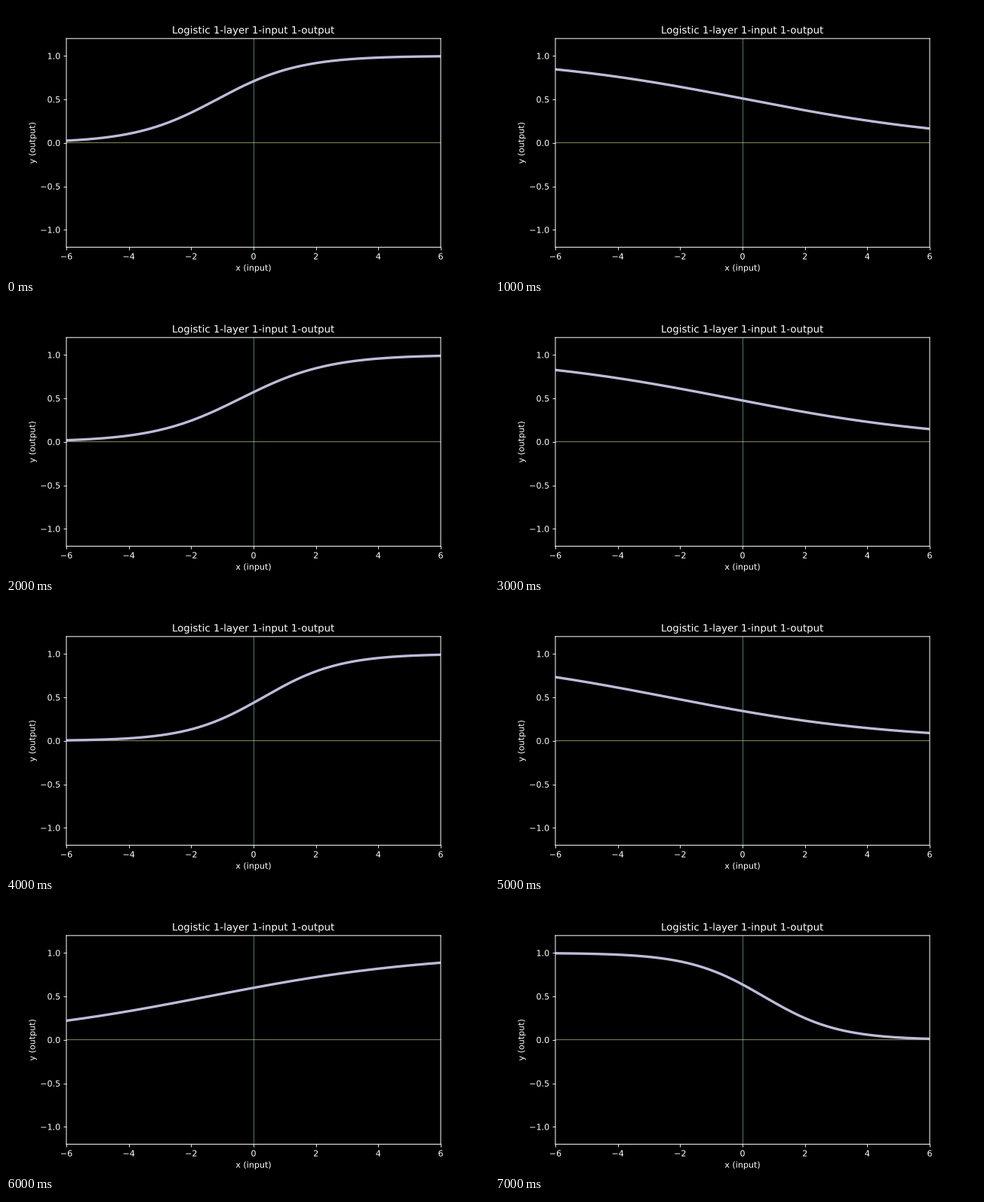
A matplotlib script that plays this animation: 640 px wide and 360 px high, repeating every 8 s.

```python
import numpy as np
import matplotlib.pyplot as plt
from matplotlib.animation import FuncAnimation
from matplotlib.patheffects import Normal
from matplotlib.text import Text

plt.style.use("dark_background")
plt.rcParams.update({"axes.linewidth": 0.9, "text.hinting": "none"})

# One neuron per step: a steep or a gentle slope, shifted by its bias
GENTLE = 0.277
WEIGHTS = [0.76, -GENTLE, 0.71, -GENTLE, 0.815, -GENTLE, GENTLE, -0.83]
BIASES = [0.89, 0.04, 0.29, -0.1, -0.25, -0.65, 0.4, 0.56]


def logistic(z):
    return 1 / (1 + np.exp(-z))


fig, ax = plt.subplots(figsize=(8, 4.5), dpi=80)
ax.set(xlim=(-6, 6), ylim=(-1.2, 1.2),
       xticks=range(-6, 7, 2), yticks=np.arange(-1, 1.1, 0.5),
       title="Logistic 1-layer 1-input 1-output",
       xlabel="x (input)", ylabel="y (output)")

ax.axvline(0, color="C0", lw=0.5)
ax.axhline(0, color="C1", lw=0.5, snap=False)
x = np.linspace(-6, 6, 200)
curve, = ax.plot(x, np.zeros_like(x), color="C2", lw=3)

# Soft edges: frame and lettering are not aligned to whole pixels
for spine in ax.spines.values():
    spine.set_snap(False)
for label in fig.findobj(Text):
    label.set_path_effects([Normal()])


def update(step):
    curve.set_ydata(logistic(WEIGHTS[step] * x + BIASES[step]))
    return curve,


anim = FuncAnimation(fig, update, frames=len(WEIGHTS), interval=1000,
                     repeat=True, repeat_delay=0)
plt.show()
```
